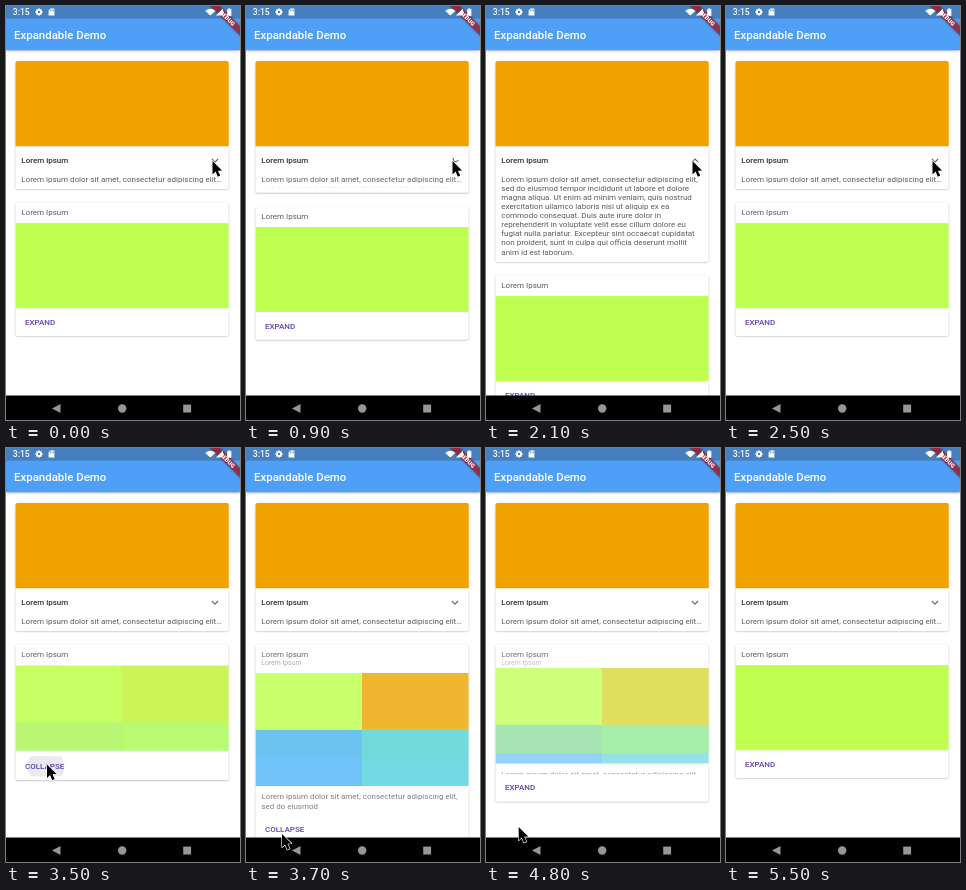
These frames come from a looping animation (234 by 414 pixels, 5.6 s). An HTML page with a canvas:

```html
<!DOCTYPE html>
<html lang="en">
<head>
<meta charset="utf-8">
<title>Expandable Demo</title>
<style>
html, body { margin: 0; width: 100%; height: 100%; overflow: hidden; background: #fff; }
canvas { display: block; width: 234px; height: 414px; }
</style>
</head>
<body>
<canvas id="stage"></canvas>
<script>
const W = 234, H = 414, LOOP = 5600, OPEN_MS = 300;
const LEFT = 9.5, RIGHT = 222.7, MID = 116, WIDTH = RIGHT - LEFT, IMAGE = 85.3, CELL = 57;
const ORANGE = '#f0a200', GREEN = '#bfff50', BLUE = '#48b3f6', TEAL = '#4bd0da';
const BODY = '#5c5c5c', FONT = 8, LINE = 9.14;

const LOREM = [
  'Lorem ipsum dolor sit amet, consectetur adipiscing elit,',
  'sed do eiusmod tempor incididunt ut labore et dolore',
  'magna aliqua. Ut enim ad minim veniam, quis nostrud',
  'exercitation ullamco laboris nisi ut aliquip ex ea',
  'commodo consequat. Duis aute irure dolor in',
  'reprehenderit in voluptate velit esse cillum dolore eu',
  'fugiat nulla pariatur. Excepteur sint occaecat cupidatat',
  'non proident, sunt in culpa qui officia deserunt mollit',
  'anim id est laborum.'
];

// time, x, y of the pointer tip
const POINTER = [
  [0, 206.5, 155], [2640, 206.5, 155], [3200, 41, 316.5], [3520, 41, 316.5],
  [3700, 36, 386], [3800, 34, 379], [4200, 32.7, 374], [4400, 32.7, 379],
  [5030, 32.7, 379], [5480, 27, 416], [5600, 27, 416]
];

const canvas = document.getElementById('stage');
const c = canvas.getContext('2d');
const dpr = window.devicePixelRatio || 1;
canvas.width = W * dpr;
canvas.height = H * dpr;

const clamp = v => Math.max(0, Math.min(1, v));
const mix = (a, b, k) => a + (b - a) * k;
const smooth = k => k * k * (3 - 2 * k);

// cubic-bezier(.4, 0, .2, 1)
function fastOutSlowIn(x) {
  let lo = 0, hi = 1;
  for (let i = 0; i < 24; i++) {
    const s = (lo + hi) / 2, r = 1 - s;
    if (1.2 * r * r * s + .6 * r * s * s + s * s * s < x) lo = s; else hi = s;
  }
  return smooth(lo);
}

function expansion(t, openAt, closeAt) {
  const opening = t < closeAt;
  const k = clamp((t - (opening ? openAt : closeAt)) / OPEN_MS);
  const eased = fastOutSlowIn(k);
  return {
    opening,
    open: t >= openAt && t < closeAt,
    fade: opening ? k : 1 - k,
    size: opening ? eased : 1 - eased
  };
}

function rect(x, y, w, h, color) {
  c.fillStyle = color;
  c.fillRect(x, y, w, h);
}

function poly(points, color) {
  c.beginPath();
  points.forEach(p => c.lineTo(p[0], p[1]));
  c.closePath();
  c.fillStyle = color;
  c.fill();
}

function disc(x, y, r, color) {
  c.beginPath();
  c.arc(x, y, r, 0, 7);
  c.fillStyle = color;
  c.fill();
}

function text(str, x, y, size = FONT, color = BODY, weight = 400) {
  c.font = `${weight} ${size}px Roboto, sans-serif`;
  c.fillStyle = color;
  c.fillText(str, x, y);
}

function clipped(x, y, w, h, draw) {
  c.save();
  c.beginPath();
  c.rect(x, y, w, h);
  c.clip();
  draw();
  c.restore();
}

function withAlpha(alpha, draw) {
  if (alpha <= 0) return;
  c.save();
  c.globalAlpha = alpha;
  draw();
  c.restore();
}

// The child that is appearing by the latest tap is painted on top.
function crossFade(e, collapsed, expanded) {
  const layers = [[1 - e.fade, collapsed], [e.fade, expanded]];
  if (!e.opening) layers.reverse();
  layers.forEach(([alpha, draw]) => withAlpha(alpha, draw));
}

function card(top, bottom) {
  c.save();
  c.shadowColor = 'rgba(0,0,0,.28)';
  c.shadowBlur = 1.6 * dpr;
  c.shadowOffsetY = .6 * dpr;
  c.beginPath();
  c.roundRect(LEFT, top, WIDTH, bottom - top, 2);
  c.fillStyle = '#fff';
  c.fill();
  c.restore();
}

function chevron(x, y, turn) {
  c.save();
  c.translate(x, y);
  c.rotate(Math.PI * turn);
  c.beginPath();
  c.moveTo(-3.1, -1.6);
  c.lineTo(0, 1.5);
  c.lineTo(3.1, -1.6);
  c.strokeStyle = '#666';
  c.lineWidth = 1.1;
  c.stroke();
  c.restore();
}

function firstCard(e) {
  const bottom = 183 + 73 * e.size;
  card(55, bottom);
  c.beginPath();
  c.roundRect(LEFT, 55, WIDTH, IMAGE, [2, 2, 0, 0]);
  c.fillStyle = ORANGE;
  c.fill();
  text('Lorem ipsum', 15.3, 157.4, FONT, '#333', 500);
  chevron(209, 154.6, e.fade);
  clipped(LEFT, 160, WIDTH, bottom - 5 - 160, () => crossFade(e,
    () => text('Lorem ipsum dolor sit amet, consectetur adipiscing elit…', 15.3, 175.5),
    () => LOREM.forEach((s, i) => text(s, 15.3, 175.5 + i * LINE))));
}

function splash(t, start, x, y) {
  const k = (t - start) / 400;
  if (k <= 0 || k >= 1) return;
  clipped(10, y - 10, 57, 20, () => withAlpha(.1 * Math.min(1, 2.4 * (1 - k)),
    () => disc(x, y, mix(4, 30, k), '#404060')));
}

function secondCard(e, shift, t) {
  c.save();
  c.translate(0, shift);
  const imageTop = 217.1 + 8 * e.size;
  const imageHeight = mix(IMAGE, 2 * CELL, e.size);
  const imageBottom = imageTop + imageHeight;
  const grow = 67 * e.size;
  card(196.5, 330 + grow);

  clipped(LEFT, 197, WIDTH, imageTop - 197, () => crossFade(e,
    () => text('Lorem Ipsum', 15.3, 209.2),
    () => {
      text('Lorem Ipsum', 15.3, 209.2);
      text('Lorem Ipsum', 15.3, 217.4, 6.83, '#999');
    }));

  clipped(LEFT, imageTop, WIDTH, imageHeight, () => crossFade(e,
    () => rect(LEFT, imageTop, WIDTH, IMAGE, GREEN),
    () => [GREEN, ORANGE, BLUE, TEAL].forEach((color, i) => {
      const x = i % 2 ? MID : LEFT;
      rect(x, imageTop + (i >> 1) * CELL, (i % 2 ? RIGHT : MID) - x, CELL, color);
    })));

  clipped(LEFT, imageBottom, WIDTH, 31 * e.size, () => withAlpha(e.fade, () => {
    text(LOREM[0], 15.3, imageBottom + 13.4);
    text('sed do eiusmod', 15.3, imageBottom + 13.4 + LINE);
  }));

  const buttonY = 316 + grow;
  splash(t, 3280, 40, buttonY);
  splash(t, 4410, 33, buttonY);
  text(e.open ? 'COLLAPSE' : 'EXPAND', 19, buttonY + 2.7, FONT, '#6440ac', 500);
  c.restore();
}

function statusIcons() {
  const white = '#fff', hole = '#457fbd';
  for (let i = 0; i < 4; i++) {
    c.save();
    c.translate(33, 6);
    c.rotate(i * Math.PI / 4);
    rect(-.8, -3.6, 1.6, 7.2, white);
    c.restore();
  }
  disc(33, 6, 2.7, white);
  disc(33, 6, 1.2, hole);
  poly([[44.4, 2.6], [48.4, 2.6], [48.4, 9.4], [42.6, 9.4], [42.6, 4.4]], white);
  [44.3, 45.7, 47.1].forEach(x => rect(x, 3.6, .7, 1.6, hole));

  c.beginPath();
  c.moveTo(204.3, 9.6);
  c.arc(204.3, 9.6, 6.8, -Math.PI * .77, -Math.PI * .23);
  c.fillStyle = white;
  c.fill();
  poly([[217, 2.4], [217, 9.6], [210, 9.6]], white);
  rect(221.2, 3.2, 4.2, 6.6, white);
  rect(222.4, 2.3, 1.8, 1, white);
}

function banner() {
  c.save();
  c.translate(W + 1, -1.5);
  c.rotate(Math.PI / 4);
  c.shadowColor = 'rgba(0,0,0,.45)';
  c.shadowBlur = 2.5 * dpr;
  rect(-30, 15.9, 60, 6.9, 'rgba(176,28,40,.72)');
  c.shadowColor = 'transparent';
  c.textAlign = 'center';
  text('DEBUG', 0, 21.4, 5.8, '#fff', 900);
  c.restore();
}

function topBar() {
  c.save();
  c.shadowColor = 'rgba(0,0,0,.4)';
  c.shadowBlur = 3 * dpr;
  c.shadowOffsetY = dpr;
  rect(0, 0, W, 44.2, '#4f9ff6');
  c.restore();
  rect(0, 0, W, 12.6, '#457fbd');
  text('Expandable Demo', 8, 32.5, 11.45, '#fff', 500);
  banner();
  // The system status bar lies above the app and its banner.
  text('3:15', 6.8, 9.1, 8.6, '#fff', 500);
  statusIcons();
}

function navBar() {
  rect(0, 389.5, W, H - 389.5, '#000');
  const gray = '#979797';
  poly([[46, 402.5], [54.5, 397.9], [54.5, 407.1]], gray);
  disc(116.2, 402.5, 4.2, gray);
  rect(177.2, 398.6, 7.9, 7.9, gray);
}

function pointer(t) {
  const i = POINTER.findIndex((p, n) => n && t <= p[0]);
  const a = POINTER[i - 1], b = POINTER[i];
  const k = smooth((t - a[0]) / (b[0] - a[0]));
  c.save();
  c.translate(mix(a[1], b[1], k), mix(a[2], b[2], k));
  c.scale(.88, .88);
  c.beginPath();
  [[0, 0], [0, 15.2], [3.5, 12], [6, 17.8], [8.7, 16.6], [6.2, 11], [10.8, 10.8]]
    .forEach(p => c.lineTo(p[0], p[1]));
  c.closePath();
  c.lineJoin = 'round';
  c.strokeStyle = '#fff';
  c.lineWidth = 1.4;
  c.stroke();
  c.fillStyle = '#000';
  c.fill();
  c.restore();
}

function draw(t) {
  c.setTransform(dpr, 0, 0, dpr, 0, 0);
  rect(0, 0, W, H, '#fff');
  const first = expansion(t, 860, 2150);
  const second = expansion(t, 3467, 4676);
  firstCard(first);
  secondCard(second, 73 * first.size, t);
  topBar();
  navBar();
  pointer(t);
}

const start = performance.now();
function frame() {
  draw((performance.now() - start) % LOOP);
  requestAnimationFrame(frame);
}
frame();
</script>
</body>
</html>
```
